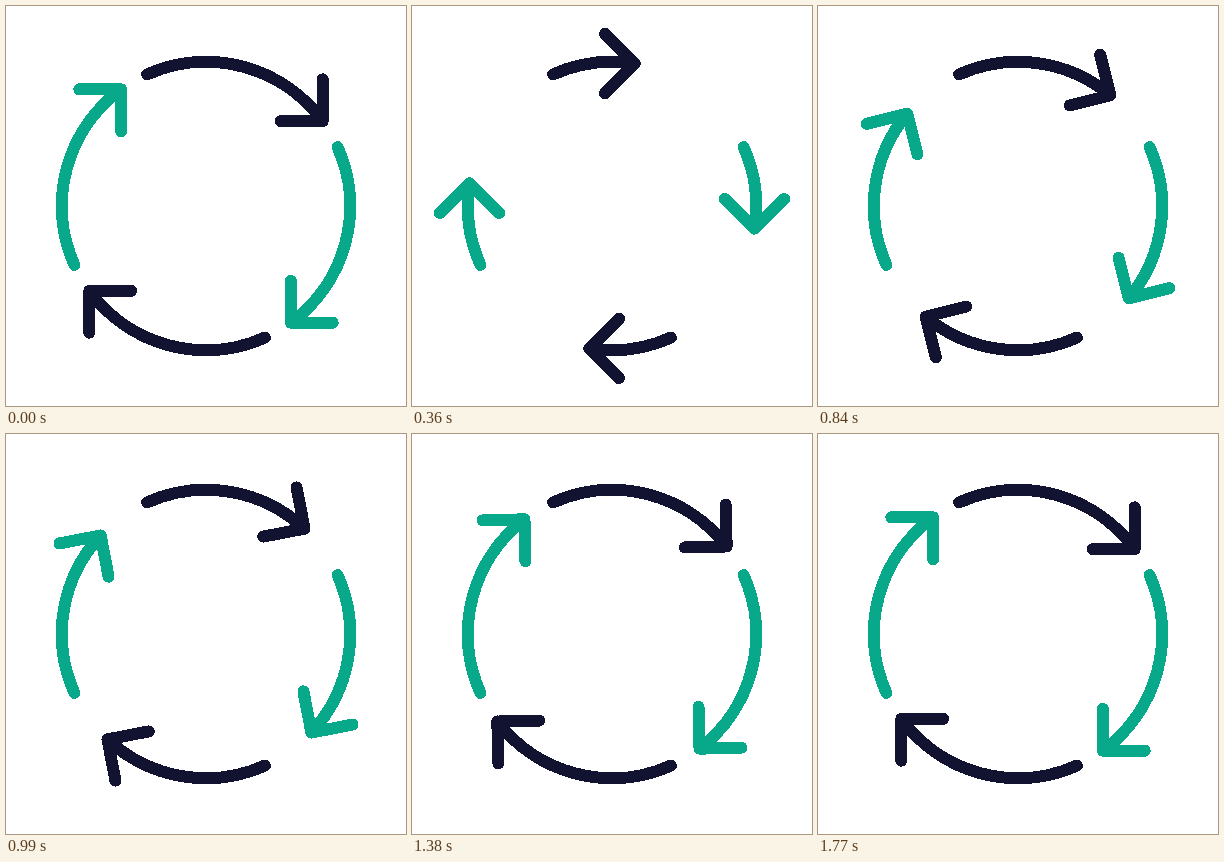
Animation, 400 px wide and 400 px high, one loop 3830 ms. Source, as an HTML page:

```html
<!DOCTYPE html>
<html lang="en">
<head>
<meta charset="utf-8">
<title>Cycle arrows</title>
<style>
  html, body { margin: 0; height: 100%; overflow: hidden; background: #fff; }
  svg { display: block; width: 100%; height: 100%; }
</style>
</head>
<body>
<svg viewBox="-200 -200 400 400" fill="none" stroke-width="12" stroke-linecap="round" stroke-linejoin="round" shape-rendering="crispEdges">
  <defs>
    <g id="arrow">
      <path id="shaft"/>
      <path id="head" d="M74.8 -84.8H116.7V-126.7"/>
    </g>
  </defs>
  <use href="#arrow" stroke="#121331"/>
  <use href="#arrow" stroke="#08a88a" transform="rotate(90)"/>
  <use href="#arrow" stroke="#121331" transform="rotate(180)"/>
  <use href="#arrow" stroke="#08a88a" transform="rotate(270)"/>
</svg>
<script>
  const LOOP = 3830, STEP = 30;
  const RADIUS = 144.2, TAIL = -24.1, TIP = 54; // degrees clockwise from the top
  // [time in ms, swing of the head in degrees]
  const KEYS = [[0, 0], [495, -55], [900, -11.6], [1510, 0], [LOOP, 0]];

  const shaft = document.getElementById('shaft');
  const head = document.getElementById('head');

  const smooth = x => x * x * (3 - 2 * x);

  function swingAt(time) {
    const next = KEYS.findIndex(key => key[0] > time);
    const [t0, a] = KEYS[next - 1], [t1, b] = KEYS[next];
    return a + (b - a) * smooth((time - t0) / (t1 - t0));
  }

  function pointAt(degrees) {
    const angle = degrees * Math.PI / 180;
    return `${RADIUS * Math.sin(angle)} ${-RADIUS * Math.cos(angle)}`;
  }

  const start = performance.now();

  function draw(now) {
    const time = Math.max(0, now - start) % LOOP;
    const swing = swingAt(time - time % STEP);
    shaft.setAttribute('d', `M${pointAt(TAIL)}A${RADIUS} ${RADIUS} 0 0 1 ${pointAt(TIP + swing)}`);
    head.setAttribute('transform', `rotate(${swing})`);
    requestAnimationFrame(draw);
  }
  draw(start);
</script>
</body>
</html>
```
